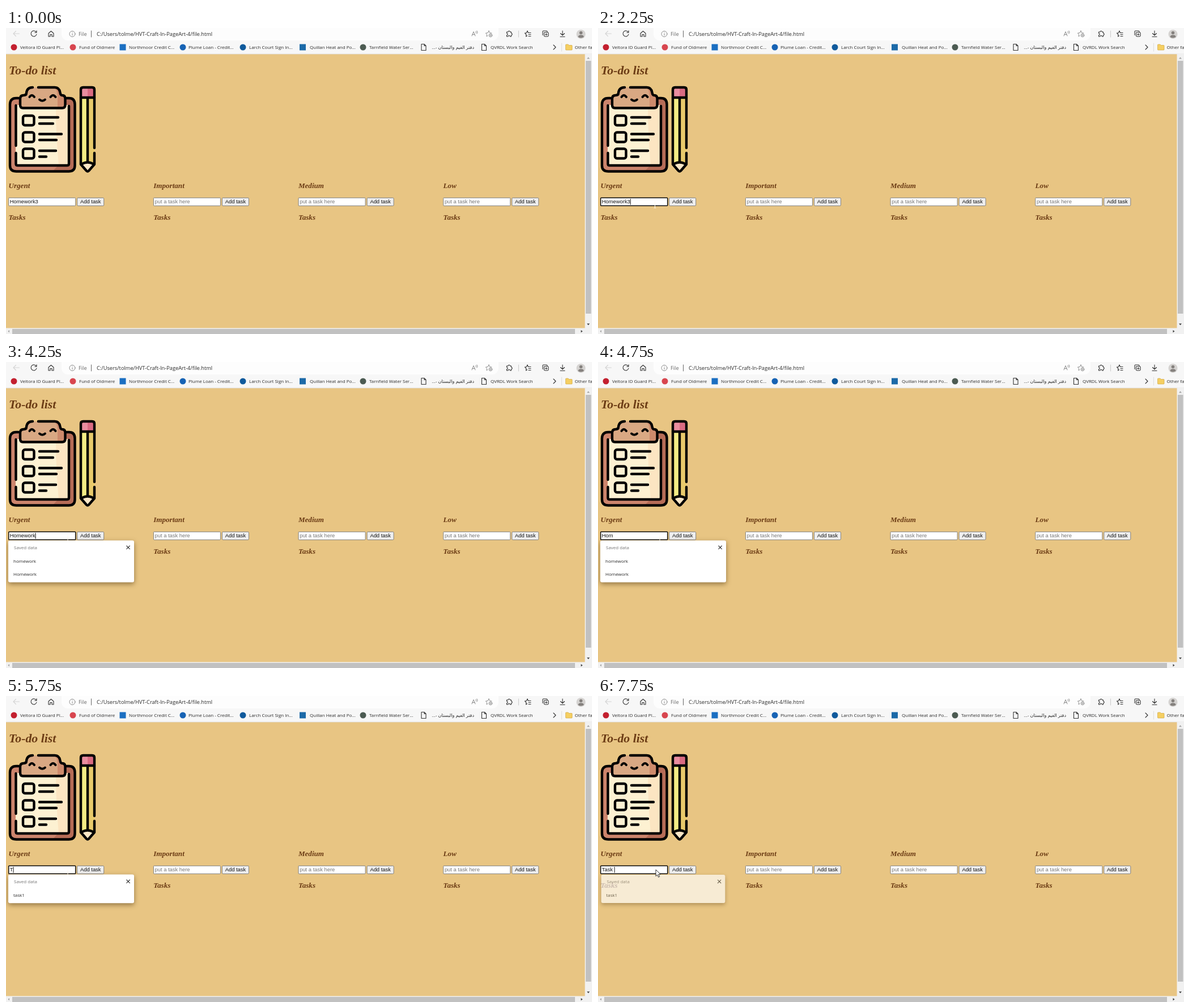
Animation, 1034 px wide and 541 px high, one loop 8000 ms. Source, as an HTML page:

```html
<!DOCTYPE html>
<html lang="en">
<head>
<meta charset="utf-8">
<title>To-do list</title>
<style>
  html, body { margin: 0; width: 100%; height: 100%; overflow: hidden; background: #e8c583; }
  svg { display: block; width: 100vw; height: 100vh; }
  text { white-space: pre; }
  .ui { font-family: "Open Sans", "DejaVu Sans", sans-serif; font-size: 8px; fill: #2b2b2b; }
  .address { font-size: 9.25px; }
  .form { font-family: "Liberation Sans", sans-serif; font-size: 9.4px; fill: #111; }
  .hint { fill: #757575; }
  .head { font-family: "Liberation Serif", serif; font-weight: bold; font-style: italic; font-size: 13.1px; fill: #6b3b14; }
  .title { font-size: 21.8px; }
  .field { fill: #fff; stroke: #808080; }
  .field.hover { stroke: #3a3a3a; }
  .field.focus { stroke: #101010; stroke-width: 1.5; }
  .icon { fill: none; stroke: #333; stroke-width: 1.1; stroke-linecap: round; stroke-linejoin: round; }
  .ink { fill: none; stroke: #000; stroke-width: 4.4; stroke-linecap: round; stroke-linejoin: round; }
  #popup > rect { fill: #fff; filter: drop-shadow(0 3px 4px rgba(60, 35, 0, .5)); }
</style>
</head>
<body>
<svg id="stage" viewBox="0 0 1034 541">
  <rect width="1034" height="541" fill="#e8c583"/>

  <!-- browser chrome -->
  <rect width="1034" height="46" fill="#f7f7f7"/>
  <rect x="98" y="-10" width="771" height="32" rx="11" fill="#fdfdfd"/>
  <path d="M0 46H1034" stroke="#dcdcdc" stroke-width=".8"/>
  <g class="icon">
    <path d="M23.5 10H13M17.5 5.5L13 10L17.5 14.500" stroke="#d4d4d4"/>
    <path id="reload" d="M53.5 7.5A5 5 0 1 0 54 11M54 4.8V8H50.8"/>
    <path id="stop" d="M45 6L53 14M53 6L45 14"/>
    <path d="M75 9.5L79.5 5.5L84 9.5V15H81V11.5H78V15H75Z"/>
    <g stroke="#808080" stroke-width=".9">
      <circle cx="117" cy="10.5" r="5"/>
      <path d="M117 10V13M117 7.8V8"/>
      <path d="M150.5 5V16" stroke="#555"/>
      <path d="M822 14L825 6.5L828 14M823 11.5H827M829 6Q830.5 7.5 829 9M831 5Q833.3 7.5 831 10"/>
      <path d="M852 5L853.6 8.5L857 9M850 13.5L848 15L848.5 11.5L846.5 9L850.3 8.5L852 5"/>
      <circle cx="855" cy="13" r="2.8"/><path d="M854 13H856M855 12V14"/>
    </g>
    <path d="M883.500 7H886A1.700 1.700 0 0 1 889.400 7H891.500V9.300A1.700 1.700 0 0 1 891.500 12.700V15H889.400A1.700 1.700 0 0 0 886 15H883.500V12.700A1.700 1.700 0 0 0 883.500 9.300Z"/>
    <path d="M904.5 5V16" stroke="#ccc"/>
    <path d="M920 5L921.5 8.5H926M920 5L918.5 8.5L915.5 9L918 11.5L917.5 15L919.5 13.7M922 11.5H926M922 14.5H926"/>
    <path d="M947 12.5V6.5Q947 5 948.5 5H953.5Q955 5 955 6.5"/>
    <rect x="949.5" y="7.5" width="7.5" height="7.5" rx="1.5"/><path d="M951.5 11.2H955M953.2 9.5V13"/>
    <path d="M982 5V12.5M978.5 9.5L982 13L985.5 9.5M978 15.5H986"/>
    <path d="M966 30L970 34L966 38"/>
    <path d="M980.5 27V41" stroke="#ddd"/>
  </g>
  <circle cx="1014.5" cy="11" r="8" fill="#d5d3d1"/>
  <circle cx="1014.5" cy="8.5" r="2.8" fill="#85817e"/>
  <path d="M1009.5 16Q1009.5 12.2 1014.5 12.2T1019.5 16Q1014.5 19 1009.5 16" fill="#85817e"/>
  <g class="ui">
    <text class="address" x="128" y="13.700" fill-opacity=".7">File</text>
    <text class="address" x="160" y="13.700">C:/Users/tolme/HVT-Craft-In-PageArt-4/file.html</text>
    <text x="826" y="37" direction="rtl">دفتر الغيم والبستان -...</text>
    <text x="1003.5" y="37">Other favorites</text>
  </g>
  <path d="M987.5 30Q987.5 29 988.5 29H992L993.5 30.5H998Q999 30.5 999 31.5V38Q999 39 998 39H988.5Q987.5 39 987.5 38Z" fill="#f5cf62" stroke="#c99a2e" stroke-width=".6"/>
  <g id="bookmarks"></g>

  <!-- scrollbars -->
  <path d="M1021.5 46H1034V541H0V530.5H1021.5Z" fill="#f1f1f1"/>
  <path d="M1023 58H1032.5V505H1023ZM11 532H1004V541H11Z" fill="#c1c1c1"/>
  <path d="M1025 54.5L1027.5 51.5L1030 54.5ZM6 534L3.5 536.2L6 538.5Z" fill="#a3a3a3"/>
  <path d="M1025 522.5L1027.5 525.5L1030 522.5ZM1014.5 534L1017.5 536.2L1014.5 538.5Z" fill="#404040"/>

  <text class="head title" x="5" y="81.500">To-do list</text>

  <!-- clipboard -->
  <rect x="7" y="124" width="114.500" height="129.500" rx="11" fill="#cc846c"/>
  <path d="M105 124H111Q121.500 124 121.500 135V243Q121.500 253.500 111 253.500H82L92 243H105Z" fill="#b66c57"/>
  <rect x="17" y="136" width="94" height="107" rx="4" fill="#fdf1d2"/>
  <path d="M88 136H111V243H93Q88 190 88 136" fill="#fce5c2"/>
  <path d="M25 141V124Q25 119 30 119H35Q36 105 45 105H87Q95 105 96 119H100Q104.500 119 104.500 124V141Z" fill="#d9a883"/>
  <path d="M83 105H87Q95 105 96 119H100Q104.500 119 104.500 124V141H91V119Q90 106 83 105" fill="#cd8a6c"/>
  <g class="ink">
    <path d="M22 124H18Q7 124 7 135V243Q7 253.500 18 253.500H111Q121.500 253.500 121.500 243V135Q121.500 124 111 124H107"/>
    <path d="M17.500 137V208M17.500 221V240Q17.500 243 20 243H108Q111 243 111 240V138"/>
    <path d="M47 105Q37 105 36 115Q36 119 31 119Q25 119 25 125V136Q25 141.500 30 141.500H99Q104.500 141.500 104.500 136V125Q104.500 119 99 119Q96 119 95.500 114Q94 105 86 105H57"/>
    <path stroke-width="4" d="M41.500 122Q45.500 116 50 122M78.500 122Q83 116 87.500 122M59 126.500Q64 131 69 126.500"/>
    <g id="checks"></g>
    <path d="M59 158H92M59 169H83M59 187.500H98M59 198H89M59 217H88M59 227.500H71"/>
  </g>

  <!-- pencil -->
  <path d="M132 122H144V239H132Z" fill="#f4ec85"/>
  <path d="M144 122H156V239H144Z" fill="#e9ca6b"/>
  <path d="M132 122V108Q132 105 135 105H153Q156 105 156 108V122Z" fill="#e98d9f"/>
  <path d="M144 105H153Q156 105 156 108V122H144Z" fill="#da6b82"/>
  <path d="M132 241Q144 234 156 241L145 253.500H142Z" fill="#fce6c6"/>
  <g class="ink">
    <path d="M156 212V109Q156 105 152 105H136Q132 105 132 109V241L142 252.500Q144 254.500 146 252.500L156 241V221"/>
    <path d="M132 123H156M144 123V236M133 241Q144 234 155 241"/>
  </g>

  <g id="columns"></g>
  <path id="caret" stroke="#000" stroke-width=".9"/>
  <path id="beam" d="M0 -6V6M-1.7 6.500H-.5M.5 6.500H1.7" stroke="#fffaf0" fill="none"/>

  <g id="popup">
    <rect x="4" y="315.500" width="222" rx="3"/>
    <g class="ui">
      <text x="14" y="330.800" fill-opacity=".65">Saved data</text>
      <text id="row0" x="13" y="354.800"></text>
      <text id="row1" x="13" y="378.300"></text>
    </g>
    <path class="icon" d="M212.800 325L218.400 330.600M218.400 325L212.800 330.600"/>
  </g>
  <path id="arrow" d="M0 0V11.500L2.700 9L4.600 13.300L6.600 12.400L4.700 8.200H8.300Z" fill="#fff" stroke="#000" stroke-width=".8"/>
</svg>
<script>
  const $ = id => document.getElementById(id);
  const LOOP = 8000;

  const square = (x, color) => `<rect x="${x - 5.5}" y="28.5" width="11" height="11" fill="${color}"/>`;
  const disc = (x, color) => `<circle cx="${x}" cy="34" r="5.5" fill="${color}"/>`;
  const page = x => `<path class="icon" d="M${x - 4} 28.5H${x + 1}L${x + 4} 31.5V39.5H${x - 4}ZM${x + 1} 28.5V31.5H${x + 4}"/>`;

  const bookmarks = [
    [disc(14, '#c3202f'), 25, 'Veltora ID Guard Pl...'],
    [disc(118, '#d8464f'), 129, 'Fund of Oldmere'],
    [square(206, '#1b6fc2'), 217, 'Northmoor Credit C...'],
    [disc(312, '#1763b4'), 322, 'Plume Loan - Credit...'],
    [disc(418, '#0f5a9c'), 429, 'Larch Court Sign In...'],
    [square(523.5, '#1c6aa8'), 536, 'Quillan Heat and Po...'],
    [disc(630, '#4c5b52'), 641, 'Tarnfield Water Ser...'],
    [page(737), 0, ''],
    [page(843.5), 855, 'QVRDL Work Search']
  ];
  $('bookmarks').innerHTML = bookmarks.map(([icon, x, label]) =>
    `${icon}<text class="ui" x="${x}" y="37">${label}</text>`).join('');

  $('checks').innerHTML = [155, 184.5, 213.5].map(y =>
    `<rect x="30" y="${y}" width="19.5" height="17" rx="3.5"/>`).join('');

  $('columns').innerHTML = ['Urgent', 'Important', 'Medium', 'Low'].map((name, i) => `
    <g transform="translate(${4.5 + i * 255.7} 0)">
      <text class="head" y="283">${name}</text>
      <rect class="field" x=".2" y="300.3" width="118" height="14" rx="1"/>
      <text class="form hint" x="2.3" y="310">put a task here</text>
      <rect x="121.2" y="300.3" width="47" height="14" rx="1.5" fill="#efefef" stroke="#808080"/>
      <text class="form" x="126.500" y="310">Add task</text>
      <text class="head" y="339">Tasks</text>
    </g>`).join('');

  const field = document.querySelector('.field');
  const value = document.querySelector('.hint');

  // Each step overrides part of the state from its time onward.
  const steps = [
    [0, { text: 'Homework3', field: '', caret: false, arrow: null, beam: null, rows: [], fading: false, loading: false }],
    [500, { loading: true, arrow: [107, 246.5] }],
    [750, { loading: false, arrow: [107, 280] }],
    [1000, { arrow: null, beam: [102, 312], field: 'hover' }],
    [1250, { beam: [100.5, 312] }],
    [2250, { field: 'focus', caret: true }],
    [2750, { caret: false, beam: [106.5, 312] }],
    [3000, { beam: [109, 312] }],
    [3250, { caret: true }],
    [3750, { caret: false }],
    [4250, { text: 'Homework', caret: true, rows: ['homework', 'Homework'] }],
    [4750, { text: 'Hom', caret: false }],
    [5000, { text: '', rows: [] }],
    [5250, { caret: true }],
    [5750, { text: 'T', rows: ['task1'] }],
    [6000, { beam: null, arrow: [102, 307] }],
    [6250, { text: 'Ta' }],
    [6500, { text: 'Tas' }],
    [7000, { text: 'Task', caret: false }],
    [7500, { caret: true }],
    [7750, { text: 'Task ', fading: true }]
  ];

  const show = (el, on) => { el.style.display = on ? '' : 'none'; };
  const place = (el, at) => {
    show(el, at);
    if (at) el.setAttribute('transform', `translate(${at})`);
  };

  function render(time) {
    const s = Object.assign({}, ...steps.filter(([t]) => t <= time).map(([, patch]) => patch));

    show($('reload'), !s.loading);
    show($('stop'), s.loading);
    place($('arrow'), s.arrow);
    place($('beam'), s.beam);

    field.setAttribute('class', `field ${s.field}`);
    value.setAttribute('class', s.text ? 'form' : 'form hint');
    value.textContent = s.text || 'put a task here';

    const caretX = 7.3 + (s.text ? value.getComputedTextLength() : 0);
    show($('caret'), s.caret);
    $('caret').setAttribute('d', `M${caretX} 302V312.5`);

    const popup = $('popup');
    show(popup, s.rows.length);
    popup.setAttribute('opacity', s.fading ? 0.66 : 1);
    popup.setAttribute('transform', s.fading ? 'translate(115 341) scale(.985) translate(-115 -341)' : '');
    popup.firstElementChild.setAttribute('height', 27.5 + 23.3 * s.rows.length);
    $('row0').textContent = s.rows[0] || '';
    $('row1').textContent = s.rows[1] || '';
  }

  const start = performance.now();
  let last = null;
  function tick() {
    const time = (performance.now() - start) % LOOP;
    const index = steps.filter(([t]) => t <= time).length;
    if (index !== last) render(time);
    last = index;
    requestAnimationFrame(tick);
  }
  tick();
</script>
</body>
</html>
```
